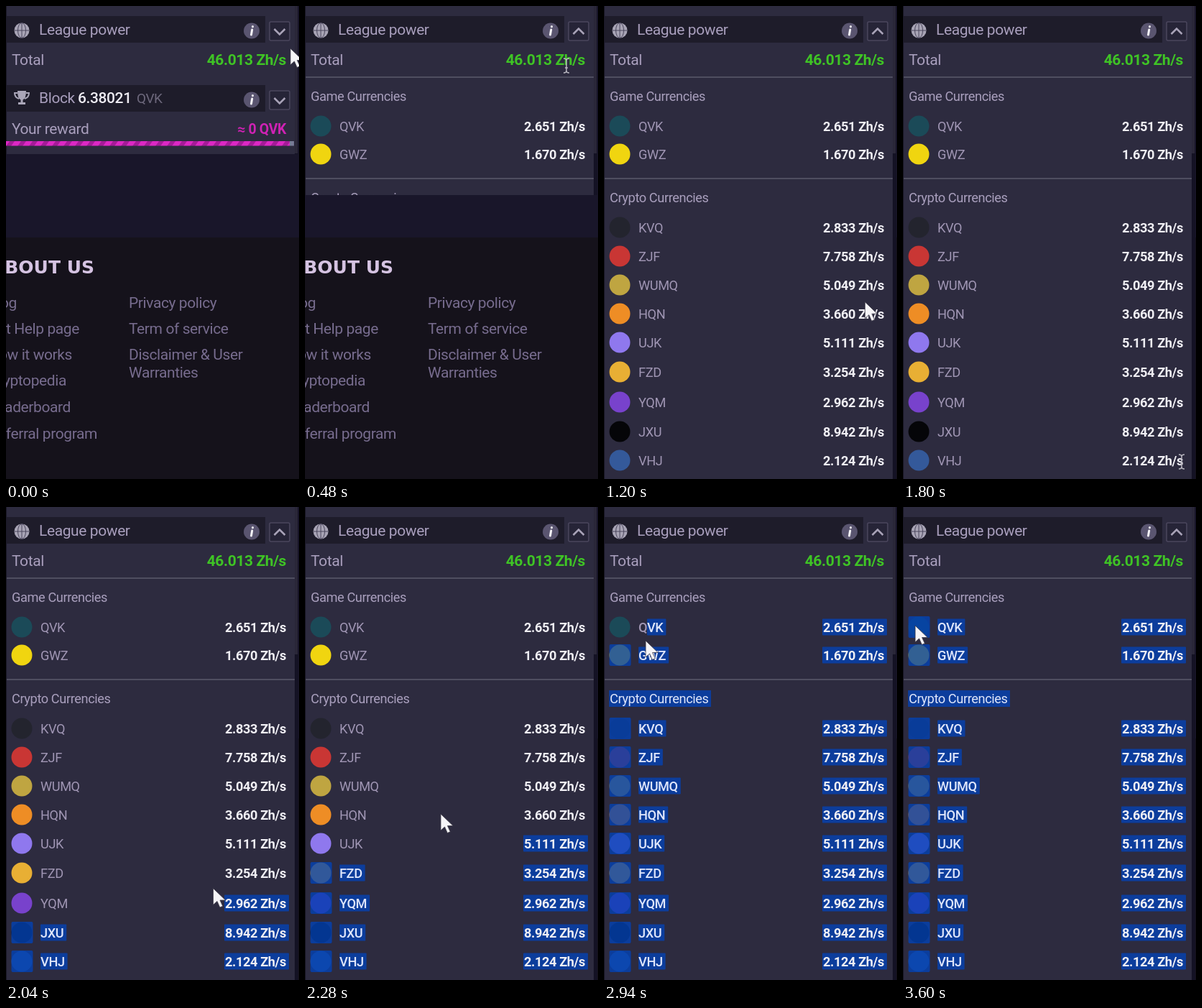
Write an HTML page that moves like this. It is 408 by 658 pixels and loops after 3900 ms.

```html
<!DOCTYPE html>
<html lang="en">
<head>
<meta charset="utf-8">
<title>League power</title>
<style>
  html, body { margin: 0; width: 100%; height: 100%; overflow: hidden; background: #15121b; }
  svg { display: block; width: 100%; height: 100%; }
  text { font: 21px Roboto, sans-serif; letter-spacing: -.4px; fill: #a99fbd; white-space: pre; }
  .end { text-anchor: end; }
  .foot text { fill: #776c8e; }
  .foot .title { font: bold 25px "DejaVu Sans", sans-serif; letter-spacing: 0; fill: #d5c3e2; }
  .small, .name { font-size: 18.2px; }
  .name { fill: #a096b4; }
  .value { font-size: 18.2px; font-weight: bold; fill: #f0eff4; }
  .total { font-weight: bold; fill: #3fc425; }
  .reward { font-size: 19.5px; font-weight: bold; fill: #cf22b4; }
  .box { fill: #0c3d9c; visibility: hidden; }
  .tint { fill: #0342b4; fill-opacity: .8; visibility: hidden; }
  .box.on, .tint.on { visibility: visible; }
  text.on, tspan.on { fill: #dfe6fb; }
  .name.on { font-weight: 500; }
  tspan.off { fill: #a096b4; }
  .line { stroke: #5b596b; stroke-width: 1.5; }
</style>
</head>
<body>
<svg viewBox="0 0 408 658" preserveAspectRatio="none">
  <defs>
    <clipPath id="reveal"><rect id="revealBox" width="402" height="206"/></clipPath>
    <pattern id="stripes" width="16" height="7" y="188" patternUnits="userSpaceOnUse">
      <path d="M0 0h16v7H0z" fill="#dc28c4"/>
      <path d="M5 0h7l-5 7H0z" fill="#a51b98"/>
    </pattern>
  </defs>

  <rect width="408" height="658" fill="#15121b"/>
  <rect width="408" height="322" fill="#19162a"/>
  <g class="foot" id="foot"><text class="title end" x="123" y="372">ABOUT US</text></g>

  <rect x="402" y="205" width="5" height="453" fill="#141224" id="track"/>
  <rect x="402" width="4" height="205" fill="#2a2739"/>
  <rect id="edge" width="1" height="206" fill="#1b1928"/>
  <rect id="panel" x="1" width="401" height="206" fill="#2d2b3f"/>

  <g id="header"></g>
  <text x="8" y="82">Total</text>
  <text class="total end" x="390" y="82">46.013 Zh/s</text>

  <g id="closed">
    <g id="block"></g>
    <text x="8" y="178">Your reward</text>
    <text class="reward end" x="390" y="178">≈ 0 QVK</text>
    <rect y="188" width="395" height="6.5" fill="url(#stripes)"/>
    <rect x="395" y="188" width="6" height="6.5" fill="#777a96"/>
  </g>

  <g id="open" clip-path="url(#reveal)">
    <path class="line" d="M1 99H402M1 240H402"/>
    <text class="small" x="8" y="132">Game Currencies</text>
    <rect class="box" id="cryptoBox" x="7" y="255" width="142" height="23"/>
    <text class="small" id="crypto" x="8" y="273">Crypto Currencies</text>
    <g id="rows"></g>
  </g>

  <g id="cursor">
    <path id="arrow" d="M0 0V23l5.5-5 3.8 8.5 4-1.8-3.8-8.2h7.7z" fill="#f5f4f7" stroke="#3a3846" stroke-width=".8"/>
    <path id="beam" d="M-4-10q4 0 4 3V7q0 3-4 3M4-10q-4 0-4 3V7q0 3 4 3M-2 3H2" fill="none" stroke="#b9b7c0" stroke-width="1.5"/>
  </g>
</svg>
<script>
const LOOP = 3900, STEP = 30, OPEN_AT = 450;
const $ = id => document.getElementById(id);

// row centre, label, coin colour, value
const coins = [
  [167, 'QVK', '#1b4a58', '2.651'], [206, 'GWZ', '#f0d510', '1.670'],
  [308, 'KVQ', '#23242e', '2.833'], [348, 'ZJF', '#c93634', '7.758'],
  [388, 'WUMQ', '#bfa541', '5.049'], [428, 'HQN', '#ee8d25', '3.660'],
  [468, 'UJK', '#8f78ee', '5.111'], [509, 'FZD', '#e8af34', '3.254'],
  [551, 'YQM', '#7842cc', '2.962'], [592, 'JXU', '#050508', '8.942'],
  [632, 'VHJ', '#34599a', '2.124']
];

// time, x, y
const cursorPath = [
  [0, 396, 59], [240, 381, 34], [330, 381, 36], [480, 364, 83], [720, 350, 287],
  [1080, 356, 345], [1600, 388, 634], [1800, 388, 634], [2280, 189, 427],
  [2700, 80, 235], [2940, 58, 186], [3300, 17, 165]
];
// time, upper edge of the text selection
const selectPath = [[1800, 634], [2280, 447], [2760, 215], [2880, 165]];

function follow(path, t) {
  const i = path.findIndex(p => p[0] > t);
  if (i < 0) return path[path.length - 1].slice(1);
  if (i === 0) return path[0].slice(1);
  const a = path[i - 1], b = path[i], k = (t - a[0]) / (b[0] - a[0]);
  return a.slice(1).map((v, n) => v + (b[n + 1] - v) * k);
}

const globe = `<circle cx="22" cy="34" r="10.5" fill="#a8a4b5"/>
  <path d="M22 23.5v21M12 34H32" stroke="#4a465c" fill="none"/>
  <ellipse cx="22" cy="34" rx="5.5" ry="10.5" stroke="#4a465c" fill="none"/>`;
const trophy = `<path d="M16 22h12q0 11-4.5 12.500V38h3.500v3H17v-3h3.500v-3.500Q16 33 16 22z" fill="#aaa6b8"/>
  <path d="M16 25h-4q0 6 6 8M28 25h4q0 6-6 8" fill="none" stroke="#aaa6b8" stroke-width="2"/>`;

const bar = (y, icon, title, chevron) => `<g transform="translate(0 ${y})">
  <rect x="1" y="14" width="360" height="37" fill="#1e1c2a"/>
  ${icon}${title}
  <circle cx="342" cy="34.5" r="11" fill="#5a5570"/>
  <path d="M343.5 28.5v.2M342.7 33l-1.2 7" stroke="#f4f3f7" stroke-width="3" stroke-linecap="round"/>
  <rect x="367" y="22" width="28" height="26" rx="2" fill="#262437" stroke="#4b475e" stroke-width="1.5"/>
  <path ${chevron} d="M373.5 32l7.500 7.500 7.500-7.500" fill="none" stroke="#a9a3b8" stroke-width="2.5"/></g>`;

$('header').innerHTML = bar(0, globe, '<text x="46" y="40">League power</text>', 'id="chevron"');
$('block').innerHTML = bar(96, trophy,
  `<text x="46" y="39">Block</text>
   <text x="100" y="39" style="font-weight:500;fill:#eeecf3">6.38021</text>
   <text x="182" y="39" style="font-size:19px;fill:#6d687c">QVK</text>`, '');

const links = [
  ['Blog', 15, 420], ['Get Help page', 102, 456], ['How it works', 92, 492],
  ['Cryptopedia', 84, 528], ['Leaderboard', 90, 565], ['Referral program', 127, 602],
  ['Privacy policy', 171, 420, 1], ['Term of service', 171, 456, 1],
  ['Disclaimer &amp; User', 171, 492, 1], ['Warranties', 171, 517, 1]
];
$('foot').innerHTML += links.map(([label, x, y, left]) =>
  `<text class="${left ? '' : 'end'}" x="${x}" y="${y}">${label}</text>`).join('');

$('rows').innerHTML = coins.map(([y, label, color, value]) => `<g>
  <circle cx="22" cy="${y}" r="14.5" fill="${color}"/>
  <rect class="tint" x="7.5" y="${y - 15}" width="30" height="30" rx="2"/>
  <rect class="box" x="48" y="${y - 11.5}" height="23" rx="1"/>
  <text class="name" x="48" y="${y + 6.5}"><tspan>${label[0]}</tspan>${label.slice(1)}</text>
  <rect class="box" x="304" y="${y - 11.5}" width="90" height="23" rx="1"/>
  <text class="value end" x="390" y="${y + 6.5}">${value} Zh/s</text></g>`).join('');

const rows = [...$('rows').children].map((g, i) => {
  const [, tint, nameBox, name, valueBox] = g.children;
  return { y: coins[i][0], tint, nameBox, name, valueBox, initial: name.firstChild };
});
const mark = (on, ...nodes) => nodes.forEach(n => n.classList.toggle('on', on));
const show = (node, on) => node.setAttribute('visibility', on ? 'visible' : 'hidden');

function select(edge, x) {
  rows.forEach((row, i) => {
    const first = i === 0;
    const reached = edge < row.y + (first ? 3 : 0);
    const named = first ? reached && x < 76 : edge < row.y - 22;
    const partial = first && x > 50;
    const right = 48 + row.name.getComputedTextLength() + 4;
    const left = partial ? 48 + row.initial.getComputedTextLength() : 48;
    row.nameBox.setAttribute('x', left);
    row.nameBox.setAttribute('width', right - left);
    row.initial.classList.toggle('off', partial);
    mark(reached, row.valueBox);
    mark(named, row.nameBox, row.name);
    mark(first ? reached && x < 36 : named, row.tint);
  });
  mark(edge < 245, $('cryptoBox'), $('crypto'));
}

function draw(now) {
  const t = Math.floor(now % LOOP / STEP) * STEP;
  const opened = t >= OPEN_AT;
  const height = opened ? Math.min(658, 206 + Math.max(0, t - 470) * 5.7) : 206;
  for (const id of ['panel', 'edge', 'revealBox']) $(id).setAttribute('height', height);
  $('track').setAttribute('height', Math.max(0, height - 205));
  show($('closed'), !opened);
  $('open').style.display = opened ? '' : 'none';
  $('chevron').setAttribute('transform', opened ? 'rotate(180 381 35.5)' : '');

  const [x, y] = follow(cursorPath, t);
  select(t > 1800 ? follow(selectPath, t)[0] : 999, x);
  const lines = opened ? [78, ...rows.map(r => r.y)] : [78];
  const overText = x > 303 && x < 392 && lines.some(line => Math.abs(y - line) < 11);
  $('cursor').setAttribute('transform', `translate(${x} ${y})`);
  show($('beam'), overText);
  show($('arrow'), !overText);
}

const start = performance.now();
function tick() {
  draw(performance.now() - start);
  requestAnimationFrame(tick);
}
tick();
</script>
</body>
</html>
```
